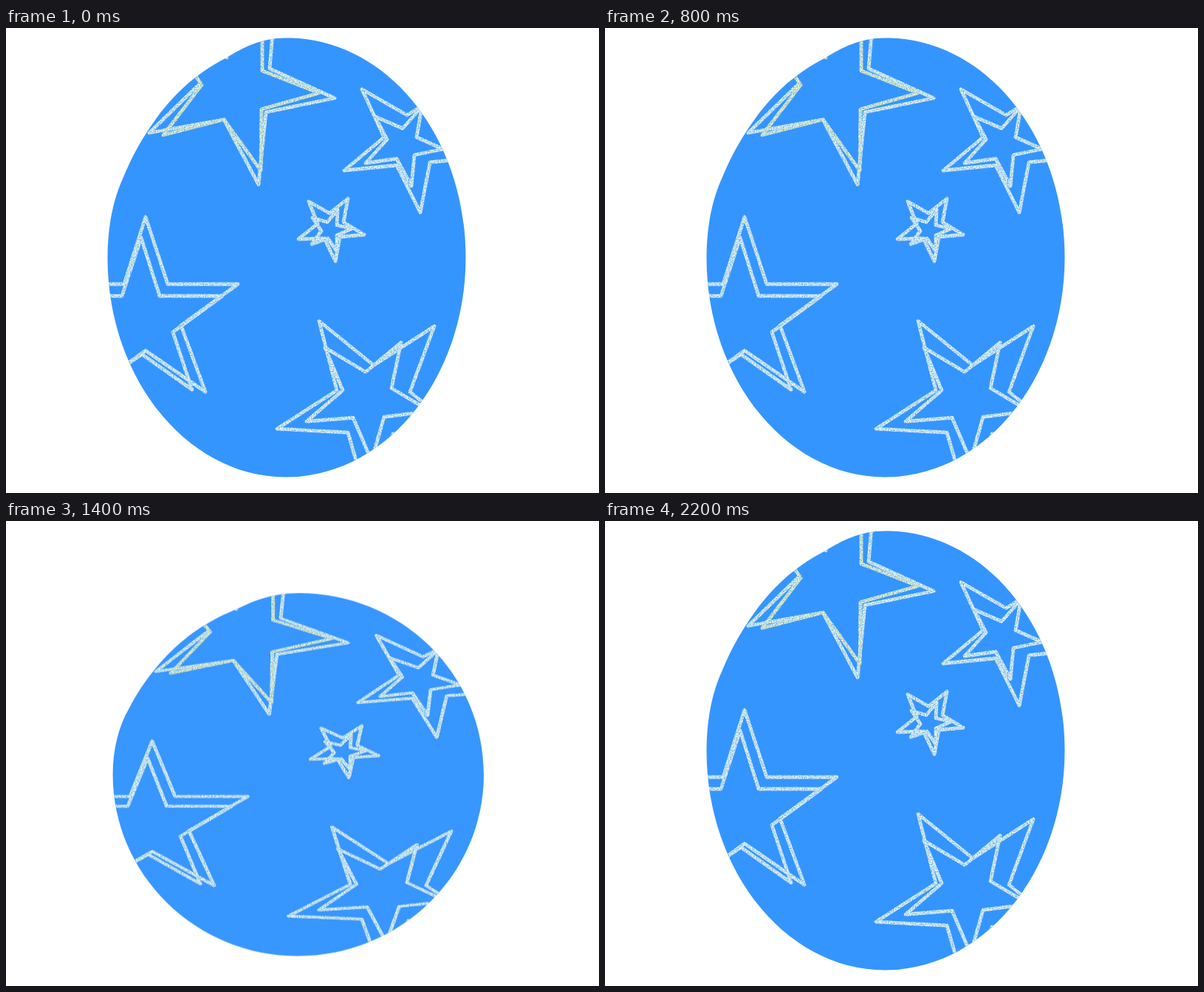
An HTML page for the animation above (2400 ms loop, 803 by 630 pixels).

```html
<!DOCTYPE html>
<html lang="en">
<head>
<meta charset="utf-8">
<title>Bouncing star egg</title>
<style>
  html, body { margin: 0; width: 100%; height: 100%; overflow: hidden; background: #fff; }
  svg { display: block; width: 803px; height: 630px; }
  .egg { fill: #3595ff; transform-origin: 0 0; animation: squash 2400ms step-end infinite; }
  .chalk { fill: none; stroke: #e4f2e8; stroke-width: 4.8; stroke-linejoin: round; stroke-linecap: round; }
  .warm { stroke: #e8f0c4; }
  @keyframes squash {
    0%, 16.666%, 33.333%, 49.999%, 74.999%, 91.666%, 100% { transform: none; fill: #3595ff; }
    8.333%, 24.999%, 41.666%, 58.333%, 83.333% {
      transform: matrix(1.0358, 0, 0, .8266, 2.2, 86.4); fill: #3896ff;
    }
  }
</style>
</head>
<body>
<svg viewBox="0 0 803 630">
  <defs>
    <path id="shell" d="M380 13.5C516 13.5 622.5 147 622.5 311S514 608.5 379 608.5C246 608.5 137.5 475 137.5 311C137.5 270 145 232 159 202C171 173 186 146 206 119C226 93 251 65 299 40C320 27 345 13.5 380 13.5Z"/>
    <clipPath id="inside"><use href="#shell"/></clipPath>
    <filter id="grain" filterUnits="userSpaceOnUse" x="100" y="0" width="560" height="630" color-interpolation-filters="sRGB">
      <feTurbulence type="fractalNoise" baseFrequency=".6" numOctaves="2" seed="4" result="noise"/>
      <feColorMatrix in="noise" values="0 0 0 0 1  0 0 0 0 1  0 0 0 0 1  2 0 0 0 -.2" result="holes"/>
      <feComposite in="SourceGraphic" in2="holes" operator="in"/>
    </filter>
    <filter id="soft"><feGaussianBlur stdDeviation=".7"/></filter>
  </defs>
  <g class="egg">
    <use href="#shell" filter="url(#soft)"/>
    <g clip-path="url(#inside)">
      <g class="chalk" filter="url(#grain)">
        <!-- top -->
        <path d="M361 8L357 55L445 95L352 114L342 212L295 124L194 142L263 75"/>
        <path class="warm" d="M347 8V58L424 88L346 110L345 193L295 124L213 145L265 77L252 58M290 34L299 40"/>
        <!-- upper right -->
        <path d="M566 104L543 118L482 83L512 148L458 193L529 186L561 250L574 182L602 179"/>
        <path d="M500 120L537 136L563 107L556 148L592 164L553 172L549 214L529 177L487 183L516 151Z"/>
        <!-- centre -->
        <path d="M410 235L438 251L463 231L457 263L485 280L452 283L446 316L431 285L396 286L422 265Z"/>
        <path d="M415 257L435 263L449 246L448 267L468 272L448 281L448 303L436 285L414 293L427 275Z"/>
        <!-- left -->
        <path d="M130 347H160L189 256L219 347H314L237 403L270 493L189 437L112 493"/>
        <path d="M130 363H157L183 284L208 363H293L226 412L252 490L184 442L115 490"/>
        <!-- lower right -->
        <path d="M490 641L463 548L367 543L448 491L424 397L498 457L580 404L547 493L621 553M490 641L524 550L621 553"/>
        <path d="M495 586L470 528L407 533L456 491L432 433L487 466L535 426L522 488L574 519L512 527Z"/>
      </g>
    </g>
  </g>
</svg>
</body>
</html>
```
